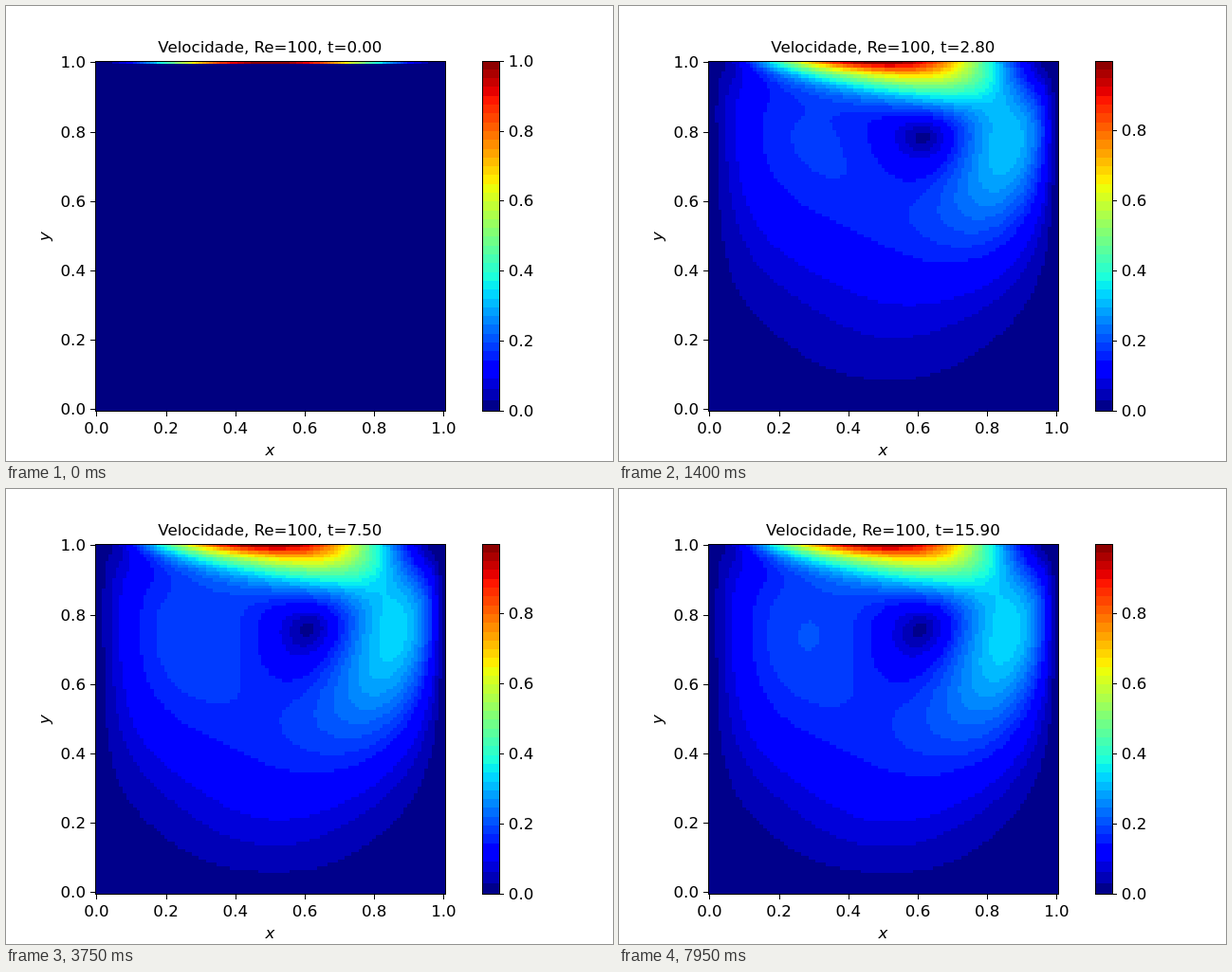
Write an HTML page with a canvas that moves like this. It is 640 px wide and 480 px high and loops after 8000 ms.

```html
<!DOCTYPE html>
<html lang="pt">
<head>
<meta charset="utf-8">
<title>Velocidade</title>
<style>
  html, body { margin: 0; width: 100%; height: 100%; overflow: hidden; background: #fff; }
  canvas { display: block; width: 640px; height: 480px; }
</style>
</head>
<body>
<canvas id="stage" width="640" height="480"></canvas>
<script>
const FRAMES = 160, FRAME_MS = 50;
const N = 50, W = N + 1, H = 1 / N;          // solver grid
const FINE = 2 * N + 1;                      // displayed grid
const NU = 0.01, SUBSTEPS = 25, DT = 0.1 / SUBSTEPS;
const RELAX = 2 / (1 + Math.sin(Math.PI / N));

const BOX = { x: 93.6, y: 57.6, size: 369.6 };
const BAR = { x: 502, w: 18 };
const LOW_EDGES = [0, 0.031, 0.064, 0.092, 0.145];
const BANDS = 38, BAND_STEP = (1 - 0.145) / 34;

// --- colours ---

const ramp = (s, a, b) => Math.min(1, Math.max(0, (s - a) / (b - a)));

function jet(s) {
  const r = ramp(s, 0.35, 0.66) - 0.5 * ramp(s, 0.89, 1);
  const g = ramp(s, 0.125, 0.375) - ramp(s, 0.64, 0.91);
  const b = 0.5 + 0.5 * ramp(s, 0, 0.11) - ramp(s, 0.34, 0.65);
  return [r, g, b].map(c => Math.round(255 * c));
}

const bandEdge = k => k < 5 ? LOW_EDGES[k] : 0.145 + (k - 4) * BAND_STEP;

function bandOf(s) {
  if (s >= 0.145) return Math.min(BANDS - 1, 4 + Math.floor((s - 0.145) / BAND_STEP));
  let k = 0;
  while (s >= LOW_EDGES[k + 1]) k++;
  return k;
}

const palette = Array.from({ length: BANDS }, (_, k) =>
  jet(k === 0 ? 0.01 : (bandEdge(k) + bandEdge(k + 1)) / 2));

// --- lid-driven cavity: stream function and vorticity ---

const lid = Float64Array.from({ length: W }, (_, i) => 16 * (i * H * (1 - i * H)) ** 2);
const psi = new Float64Array(W * W);
let vort = new Float64Array(W * W), next = new Float64Array(W * W);

function setWalls() {
  const wall = (at, inward) => (psi[at + 2 * inward] - 8 * psi[at + inward]) / (2 * H * H);
  for (let k = 1; k < N; k++) {
    const top = N * W + k;
    vort[k] = wall(k, W);
    vort[top] = wall(top, -W) - 3 * lid[k] / H;
    vort[k * W] = wall(k * W, 1);
    vort[k * W + N] = wall(k * W + N, -1);
  }
}

function moveVorticity() {
  const adv = 1 / (4 * H * H), dif = NU / (H * H);
  for (let j = 1; j < N; j++) {
    for (let i = 1; i < N; i++) {
      const p = j * W + i;
      const e = vort[p + 1], w = vort[p - 1], n = vort[p + W], s = vort[p - W];
      const flow = (psi[p + W] - psi[p - W]) * (e - w) - (psi[p + 1] - psi[p - 1]) * (n - s);
      next[p] = vort[p] + DT * (dif * (e + w + n + s - 4 * vort[p]) - adv * flow);
    }
  }
  [vort, next] = [next, vort];
}

function solveStream(limit) {
  for (let it = 0; it < limit; it++) {
    let worst = 0;
    for (let j = 1; j < N; j++) {
      for (let i = 1; i < N; i++) {
        const p = j * W + i;
        const sum = psi[p + 1] + psi[p - 1] + psi[p + W] + psi[p - W];
        const d = RELAX * ((sum + H * H * vort[p]) / 4 - psi[p]);
        psi[p] += d;
        worst = Math.max(worst, Math.abs(d));
      }
    }
    if (worst < 3e-7) break;
  }
}

// Doubles the resolution of one row or column with cubic midpoints.
function refineLine(src, from, step, dst, to, stride) {
  const at = k => src[from + k * step];
  for (let k = 0; k <= N; k++) {
    dst[to + 2 * k * stride] = at(k);
    if (k === N) break;
    let mid;
    if (k === 0) mid = (3 * at(0) + 6 * at(1) - at(2)) / 8;
    else if (k === N - 1) mid = (3 * at(N) + 6 * at(N - 1) - at(N - 2)) / 8;
    else mid = (9 * (at(k) + at(k + 1)) - at(k - 1) - at(k + 2)) / 16;
    dst[to + (2 * k + 1) * stride] = mid;
  }
}

function refine(field) {
  const wide = new Float64Array(W * FINE), out = new Float64Array(FINE * FINE);
  for (let j = 0; j < W; j++) refineLine(field, j * W, 1, wide, j * FINE, 1);
  for (let i = 0; i < FINE; i++) refineLine(wide, i, FINE, out, i, FINE);
  return out;
}

function speedBands(vmax) {
  const u = new Float64Array(W * W), v = new Float64Array(W * W);
  for (let j = 1; j < N; j++) {
    for (let i = 1; i < N; i++) {
      const p = j * W + i;
      u[p] = (psi[p + W] - psi[p - W]) / (2 * H);
      v[p] = (psi[p - 1] - psi[p + 1]) / (2 * H);
    }
  }
  u.set(lid, N * W);
  const fu = refine(u), fv = refine(v);
  return Uint8Array.from(fu, (a, p) => bandOf(Math.hypot(a, fv[p]) / vmax));
}

const topSpeed = n => n === 0 ? 1 : 0.997;

function lidOnly() {
  const bands = new Uint8Array(FINE * FINE);
  for (let i = 0; i < FINE; i++) {
    const x = i / (FINE - 1);
    bands[(FINE - 1) * FINE + i] = bandOf(16 * (x * (1 - x)) ** 2);
  }
  return bands;
}

function simulate() {
  const frames = [lidOnly()];
  for (let n = 1; n < FRAMES; n++) {
    for (let k = 0; k < SUBSTEPS; k++) {
      setWalls();
      moveVorticity();
      solveStream(n === 1 ? 200 : 30);
    }
    frames.push(speedBands(topSpeed(n)));
  }
  return frames;
}

// --- drawing ---

const ctx = document.getElementById('stage').getContext('2d');
const cells = document.createElement('canvas');
cells.width = cells.height = FINE;
const cellCtx = cells.getContext('2d');
const pixels = cellCtx.createImageData(FINE, FINE);

const FONT = '16.667px "DejaVu Sans", sans-serif';
const TICKS = [0, 0.2, 0.4, 0.6, 0.8, 1];

function label(text, x, y, align, font = FONT) {
  ctx.font = font;
  ctx.textAlign = align;
  ctx.fillText(text, x, y);
}

function frameRect(x, y, w, h) {
  ctx.strokeStyle = '#000';
  ctx.lineWidth = 1;
  ctx.strokeRect(x + 0.5, y + 0.5, w, h);
}

function drawField(bands, first) {
  for (let j = 0; j < FINE; j++) {
    for (let i = 0; i < FINE; i++) {
      const k = bands[(FINE - 1 - j) * FINE + i];
      const [r, g, b] = first && k === 0 ? [0, 0, 128] : palette[k];
      pixels.data.set([r, g, b, 255], 4 * (j * FINE + i));
    }
  }
  cellCtx.putImageData(pixels, 0, 0);
  ctx.imageSmoothingEnabled = false;
  ctx.drawImage(cells, BOX.x, BOX.y, BOX.size, BOX.size);
  frameRect(94, 58, 369, 369);
}

function drawAxes() {
  const half = BOX.size / FINE / 2, span = BOX.size - 2 * half;
  ctx.fillStyle = '#000';
  for (const t of TICKS) {
    const x = BOX.x + half + t * span;
    const y = BOX.y + BOX.size - half - t * span;
    ctx.fillRect(Math.round(x), 428, 1, 5);
    ctx.fillRect(89, Math.round(y), 5, 1);
    label(t.toFixed(1), x, 451, 'center');
    label(t.toFixed(1), 84, Math.round(y) + 6, 'right');
  }
  label('x', 278.4, 474, 'center', 'italic ' + FONT);
  ctx.save();
  ctx.translate(46, 243);
  ctx.rotate(-Math.PI / 2);
  label('y', 0, 0, 'center', 'italic ' + FONT);
  ctx.restore();
}

function drawBar(vmax) {
  const bottom = BOX.y + BOX.size;
  const yAt = s => Math.round(bottom - s * BOX.size);
  for (let k = 0; k < BANDS; k++) {
    const y = yAt(bandEdge(k + 1));
    ctx.fillStyle = `rgb(${palette[k]})`;
    ctx.fillRect(BAR.x, y, BAR.w, yAt(bandEdge(k)) - y);
  }
  frameRect(BAR.x, 58, BAR.w, 369);
  ctx.fillStyle = '#000';
  for (const t of TICKS) {
    if (t > vmax) continue;
    const y = yAt(t / vmax);
    ctx.fillRect(521, y, 4, 1);
    label(t.toFixed(1), 529.8, y + 6, 'left');
  }
}

function draw(n) {
  ctx.fillStyle = '#fff';
  ctx.fillRect(0, 0, 640, 480);
  drawField(frames[n], n === 0);
  drawAxes();
  drawBar(topSpeed(n));
  label(`Velocidade, Re=100, t=${(n / 10).toFixed(2)}`, 278.4, 49, 'center');
}

const frames = simulate();
const start = performance.now();
let shown = -1;

function tick() {
  const n = Math.floor((performance.now() - start) / FRAME_MS) % FRAMES;
  if (n !== shown) draw(shown = n);
  requestAnimationFrame(tick);
}
tick();
</script>
</body>
</html>
```
